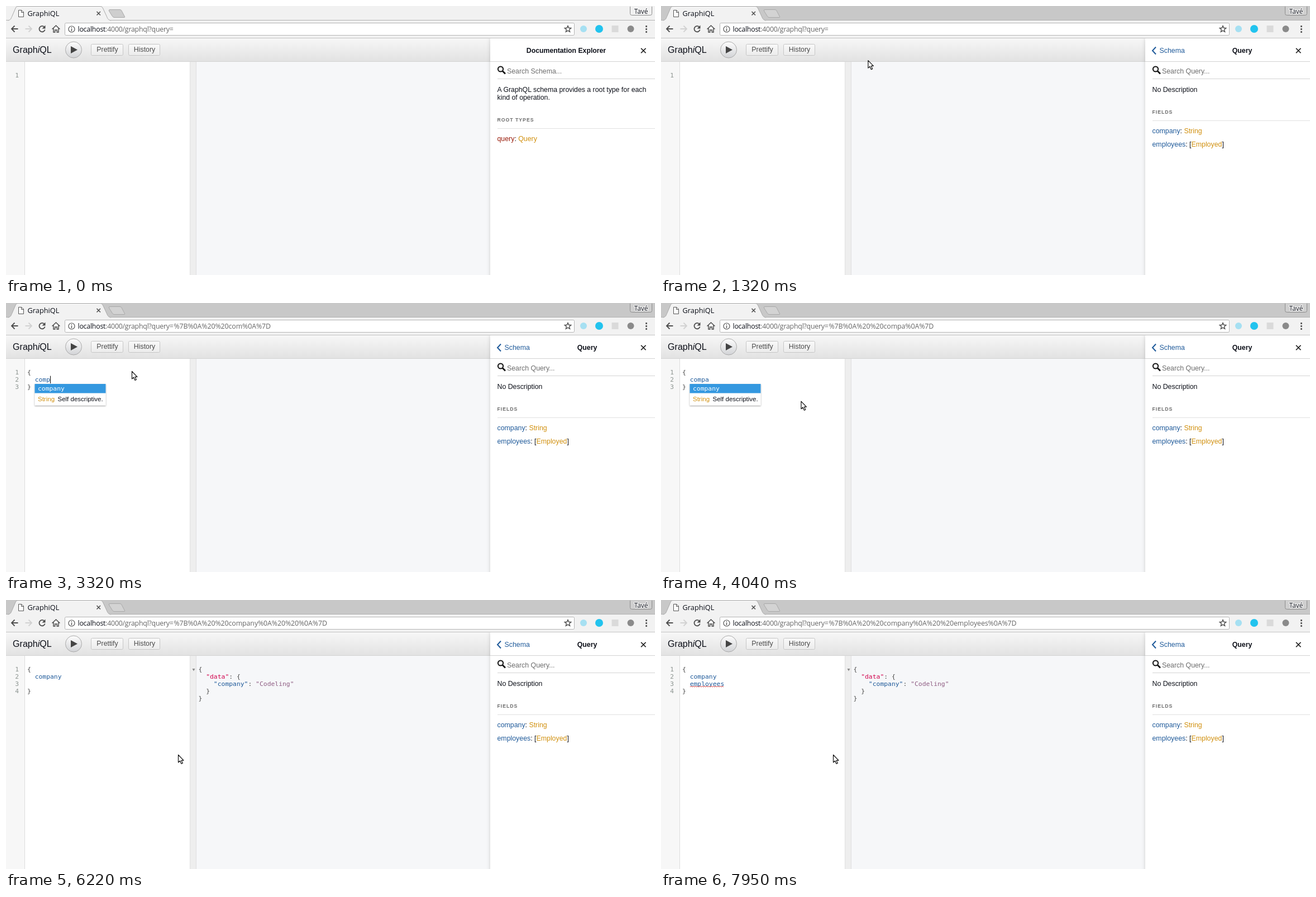
Recreate the animation shown at these times as an HTML page. Size 1162 by 482 pixels, loop 8 s.

```html
<!DOCTYPE html>
<html lang="en">
<head>
<meta charset="utf-8">
<title>GraphiQL</title>
<style>
  html, body { margin: 0; width: 100%; height: 100%; overflow: hidden; background: #fff }
  svg { display: block; font: 12.35px "Liberation Sans", Arial, sans-serif }
  text { white-space: pre; fill: #0c0f18 }
  .ui { font-family: "Open Sans", "Noto Sans", sans-serif }
  .code { font: 11.37px "DejaVu Sans Mono", monospace }
  .b { font-weight: bold }
  .head { font-weight: bold; font-size: 8.7px; letter-spacing: 1px; fill: #6c6c6c }
  .hint { fill: #6c6c6c }
  .blue { fill: #1f5a9a }
  .type { fill: #d1900f }
  .punct { fill: #4a4a4a }
  .num { fill: #8b938f; text-anchor: end }
  .mid { text-anchor: middle }
  .info { font-size: 11.5px }
  .icon { fill: none; stroke: #4d4d4d; stroke-width: 1.8 }
  .rule { stroke: #d3d3d3 }
  .thin { stroke: #e0e0e0 }
</style>
</head>
<body>
<svg width="1162" height="482" viewBox="0 0 1162 482">
  <defs>
    <linearGradient id="bar" x2="0" y2="1"><stop stop-color="#f7f7f7"/><stop offset="1" stop-color="#e2e2e2"/></linearGradient>
    <linearGradient id="btn" x2="0" y2="1"><stop stop-color="#f9f9f9"/><stop offset="1" stop-color="#ececec"/></linearGradient>
    <linearGradient id="run" x2="0" y2="1"><stop stop-color="#fdfdfd"/><stop offset="1" stop-color="#d2d3d6"/></linearGradient>
    <filter id="soft" x="-10%" y="-10%" width="120%" height="130%">
      <feDropShadow dx="0" dy="1" stdDeviation="1.3" flood-opacity=".45"/>
    </filter>
    <filter id="side" x="-10%" y="0" width="120%" height="1"><feDropShadow dx="0" dy="0" stdDeviation="3" flood-opacity=".18"/></filter>
  </defs>

  <!-- browser window -->
  <rect id="strip" width="1162" height="26"/>
  <path id="plus" d="M186 6.5H204Q206 6.5 207 8.5L212.500 19Q213.500 20.500 211 20.500H194Q191.500 20.500 190.500 18.500L184.500 9Q183.500 6.500 186 6.500Z" stroke="#a9a9a9"/>
  <path d="M0 25.500H1162" stroke="#b3b3b3"/>
  <rect y="26" width="1162" height="31" fill="#f2f2f2"/>
  <path d="M3 26C9 25 9 22 11 18L17 4Q18 .5 21 .5H169Q172 .5 173.500 4L180 18C182 23 183 25 188 26" fill="#f2f2f2" stroke="#a9a9a9"/>
  <path d="M22.500 7.500H28L31.500 11V19.500H22.500ZM27.500 8V11.500H31" fill="#fff" stroke="#555"/>
  <text class="ui" x="38.500" y="18" font-size="12.8">GraphiQL</text>
  <path d="M162.500 10L169 16.500M169 10L162.500 16.500" class="icon" style="stroke-width:1.500"/>
  <path id="badge" d="M1117.500 1V13.500Q1117.500 16.500 1120.500 16.500H1153.500Q1156.500 16.500 1156.500 13.500V1" stroke="#8c8c8c"/>
  <text class="ui mid" x="1137" y="14" font-size="11.8" stroke="#fff" stroke-width="2" paint-order="stroke">Tavé</text>
  <path d="M0 57.500H1162" stroke="#c4c4c4"/>
  <path class="icon" d="M21.500 41H10.500M15.500 35.500L10 41L15.500 46.500"/>
  <path class="icon" style="stroke:#d2d2d2" d="M34.500 41H45.500M40.500 35.500L46 41L40.500 46.500"/>
  <path class="icon" d="M68.500 37.500A5.200 5.200 0 1 0 69.700 42.500"/>
  <path d="M70.500 34.500V40.500H64.500Z" fill="#4d4d4d"/>
  <path class="icon" style="stroke-width:1.500" d="M82.500 41.500L89.500 35L96.500 41.500M85 40V47H87.700V43H91.300V47H94V40"/>
  <rect x="105.500" y="30.500" width="912" height="22" rx="2" fill="#fff" stroke="#b5b5b5"/>
  <circle cx="117.500" cy="41.500" r="5.500" class="icon" style="stroke-width:1.200"/>
  <path d="M117.500 38V39.500M117.500 40.700V45" class="icon" style="stroke-width:1.400"/>
  <text class="ui" x="128.500" y="45.500" font-size="12.4" letter-spacing="-.25">localhost<tspan fill="#666">:4000/graphql?query=</tspan></text>
  <text class="ui" id="url" x="300.500" y="45.500" font-size="12.4" letter-spacing="-.1" style="fill:#666"></text>
  <path class="icon" style="stroke-width:1.400" d="M1006 35.500L1007.600 39.300L1011.700 39.600L1008.600 42.300L1009.600 46.300L1006 44.100L1002.400 46.300L1003.400 42.300L1000.300 39.600L1004.400 39.300Z"/>
  <circle cx="1034" cy="41" r="6" fill="#a6e0f2"/>
  <circle cx="1062" cy="41" r="7" fill="#22c3ee"/>
  <rect x="1084.500" y="35" width="12" height="12" fill="#dadada"/>
  <circle cx="1118.500" cy="41" r="6" fill="#8a8a8a"/>
  <path d="M1146.500 35V38M1146.500 40V43M1146.500 45V48" stroke="#4d4d4d" stroke-width="2.500"/>

  <!-- page panes -->
  <rect y="58" width="1162" height="42" fill="url(#bar)"/>
  <path class="rule" d="M0 99.500H867"/>
  <text x="12" y="84" font-size="16.1">Graph<tspan font-style="italic">i</tspan>QL</text>
  <circle cx="121" cy="78.500" r="14.500" fill="url(#run)" stroke="#a9a9a9"/>
  <path d="M116 72V85L128 78.500Z" fill="#444"/>
  <g fill="url(#btn)" stroke="#c6c6c6">
    <rect x="152.500" y="68.500" width="57" height="20" rx="2"/>
    <rect x="219.500" y="68.500" width="56" height="20" rx="2"/>
  </g>
  <text class="mid punct" x="181.500" y="82.300">Prettify</text>
  <text class="mid punct" x="248" y="82.300">History</text>
  <rect y="100" width="33" height="382" fill="#f7f7f7"/>
  <path d="M33.500 100V482" stroke="#ddd"/>
  <rect x="329" y="100" width="12" height="382" fill="#eee"/>
  <path class="thin" d="M329.500 100V482M340.500 100V482"/>
  <rect x="341" y="100" width="526" height="382" fill="#f6f7f9"/>

  <!-- documentation -->
  <rect x="867" y="58" width="310" height="440" fill="#fff" filter="url(#side)"/>
  <path class="rule" d="M867 99.500H1162M880 130.500H1162"/>
  <path d="M1137 75.800L1145.500 84.300M1145.500 75.800L1137 84.300" stroke="#111" stroke-width="1.600"/>
  <circle cx="885.500" cy="113" r="4.600" fill="none" stroke="#111" stroke-width="2"/>
  <path d="M889 116.500L894 121.500" stroke="#111" stroke-width="2.600"/>
  <g id="schema">
    <text class="mid b" x="1003" y="84" font-size="12.25">Documentation Explorer</text>
    <text class="hint" x="897" y="121">Search Schema...</text>
    <text x="879.500" y="153.500" font-size="12.3">A GraphQL schema provides a root type for each</text>
    <text x="879.500" y="167.500" font-size="12.3">kind of operation.</text>
    <text class="head" x="879.500" y="207.300">ROOT TYPES</text>
    <path class="thin" d="M880 219.500H1162"/>
    <text x="879.500" y="242"><tspan fill="#991a08">query</tspan>: <tspan id="link" class="type">Query</tspan></text>
  </g>
  <g id="query">
    <path d="M886 73.500L880 80L886 86.500" fill="none" stroke="#1f5a9a" stroke-width="2"/>
    <text class="blue" x="892.500" y="84">Schema</text>
    <text class="mid b" x="1040.500" y="84">Query</text>
    <text class="hint" x="897" y="121">Search Query...</text>
    <text x="879.500" y="153.500">No Description</text>
    <text class="head" x="879.500" y="193.300">FIELDS</text>
    <path class="thin" d="M880 205.500H1162"/>
    <text x="879.500" y="228"><tspan class="blue">company</tspan>: <tspan class="type">String</tspan></text>
    <text x="879.500" y="252"><tspan class="blue">employees</tspan>: [<tspan class="type">Employed</tspan>]</text>
  </g>

  <g id="spinner" fill="none" stroke="#969696" stroke-width="6">
    <circle cx="592" cy="354" r="15" opacity=".15"/>
    <path d="M581.400 343.400A15 15 0 0 1 602.600 343.400" opacity=".8"/>
  </g>
  <g id="result" class="code">
    <text class="punct" x="344.500" y="128">{</text>
    <text class="punct" x="344.500" y="141.100">  <tspan fill="#d2054e">"data"</tspan>: {</text>
    <text class="punct" x="344.500" y="154.200">    <tspan class="blue">"company"</tspan>: <tspan fill="#8f5d83">"Codeling"</tspan></text>
    <text class="punct" x="344.500" y="167.300">  }</text>
    <text class="punct" x="344.500" y="180.400">}</text>
  </g>
  <path id="fold" d="M333.500 123H338.500L336 127.500Z" fill="#8a8a8a"/>
  <g id="editor" class="code"></g>
  <g id="pointer" fill="#fff" stroke="#111" stroke-width="1.200" stroke-linejoin="round">
    <path id="arrow" d="M.5 .5V14L3.600 11.200L6 16.500L8.300 15.500L6 10.300H10Z"/>
    <path id="hand" d="M-.5 .5Q-2.500 .5-2 2.500L.5 7.500L-2 7Q-4 7.500-3 9L2 13.500H9L11 10V6.500Q10 5 8.500 6Q7.500 4.300 6 5.300Q5 3.800 3.300 4.700L1.500 1.500Q.800 .5-.5 .5Z"/>
  </g>
</svg>
<script>
const LOOP = 8000, LINE = 13.1, CHAR = 6.845, LEFT = 38, DEBOUNCE = 175, BLINK = 530;
const $ = id => document.getElementById(id);
const show = (id, on) => $(id).style.display = on ? '' : 'none';

// [time, text, caret line, caret column]
const edits = [[0, '', 0, 0], [2450, '{}', 0, 1]];
const type = (before, line, steps) => steps.forEach(([time, word]) =>
  edits.push([time, `{\n${before}  ${word}\n}`, line, word.length + 2]));
type('', 1, [[2700, ''], [2900, 'c'], [2980, 'co'], [3050, 'com'], [3290, 'comp'], [3350, 'compa'], [4820, 'company']]);
type('  company\n', 2, [[5690, ''], [6750, 'e'], [6940, 'em'], [7020, 'emp'], [7410, 'employees']]);

// [from, to, line, items, type]
const popups = [
  [2930, 4820, 1, ['company'], 'String'],
  [6960, 7020, 2, ['employees', '__schema'], '[Employed]'],
  [7020, 7410, 2, ['employees'], '[Employed]']
];

// [time, x, y]
const path = [
  [120, 896, 184], [450, 920, 226], [720, 942, 232], [860, 942, 232], [940, 890, 205],
  [1100, 640, 125], [1240, 440, 93], [1320, 371, 97], [1450, 285, 114], [1650, 225, 122],
  [3940, 225, 122], [4040, 250, 175], [4140, 292, 250], [4240, 308, 277]
];

function pointerAt(t) {
  const i = path.findIndex(p => p[0] > t);
  if (i < 0) return path.at(-1).slice(1);
  const [a, b] = [path[Math.max(i - 1, 0)], path[i]];
  const k = b[0] > a[0] ? (t - a[0]) / (b[0] - a[0]) : 0;
  return [a[1] + (b[1] - a[1]) * k, a[2] + (b[2] - a[2]) * k];
}

function caretOn(t, edited) {
  if (t < 2450) return t >= 1750 && t < 2250;
  const start = t >= 5200 && edited < 5200 ? 5200 : edited;
  return (t - start) % (2 * BLINK) < BLINK;
}

function popup([, , line, items, kind]) {
  const x = 51.5, y = 118.8 + LINE * (line + 1), row = 16.5;
  const width = kind === 'String' ? 127 : 154, end = y + row * items.length;
  return `<rect x="${x}" y="${y}" width="${width}" height="${row * items.length + 22}" fill="#fff" filter="url(#soft)"/>
    <rect x="${x}" y="${y}" width="${width}" height="${row}" fill="#3498e0"/>` +
    items.map((s, i) => `<text x="57" y="${y + 12 + row * i}" ${i ? '' : 'style="fill:#fff"'}>${s}</text>`).join('') +
    `<g font-family="Liberation Sans, Arial, sans-serif"><text class="info" x="57" y="${end + 14.5}"><tspan class="type">${kind}</tspan></text>
    <text class="info" x="${x + width - 86}" y="${end + 14.5}">Self descriptive.</text></g>`;
}

function editor(t) {
  const [time, text, line, col] = edits.findLast(e => e[0] <= t);
  let out = text.split('\n').map((s, i) => {
    const y = 128 + LINE * i;
    return `<text class="num" x="23" y="${y}">${i + 1}</text>
      <text class="${/[{}]/.test(s) ? 'punct' : 'blue'}" x="${LEFT}" y="${y}">${s}</text>`;
  }).join('');
  if (t >= 7890) out += `<path d="M52 156${'l2 -1.8l2 1.8'.repeat(15)}" fill="none" stroke="#d9302c" stroke-width=".9"/>`;
  if (caretOn(t, time)) out += `<rect x="${LEFT + CHAR * col}" y="${117.5 + LINE * line}" width="1" height="13.5" fill="#000"/>`;
  const open = popups.find(p => t >= p[0] && t < p[1]);
  return out + (open ? popup(open) : '');
}

// The address follows once typing has paused.
const address = t => encodeURIComponent(edits.findLast((e, i) =>
  e[0] + DEBOUNCE <= t && !(edits[i + 1]?.[0] < e[0] + DEBOUNCE))?.[1] ?? '');

let drawn;
function frame(now) {
  const t = now % LOOP, focused = t >= 860, hover = t >= 500 && !focused;
  $('strip').style.fill = focused ? '#c8c8c8' : '#f1f1f1';
  $('plus').style.fill = focused ? '#d3d3d3' : '#cecece';
  $('badge').style.fill = focused ? '#cfcfcf' : '#f1f1f1';
  show('schema', !focused);
  show('query', focused);
  $('link').style.textDecoration = hover ? 'underline' : 'none';
  show('spinner', t >= 5200 && t < 5250);
  show('result', t >= 5250);
  show('fold', t >= 5640);
  const html = editor(t);
  if (html !== drawn) $('editor').innerHTML = drawn = html;
  $('url').textContent = address(t);
  show('pointer', t >= 120);
  show('hand', hover);
  show('arrow', !hover);
  $('pointer').setAttribute('transform', `translate(${pointerAt(t)})`);
  requestAnimationFrame(frame);
}
frame(performance.now());
</script>
</body>
</html>
```
